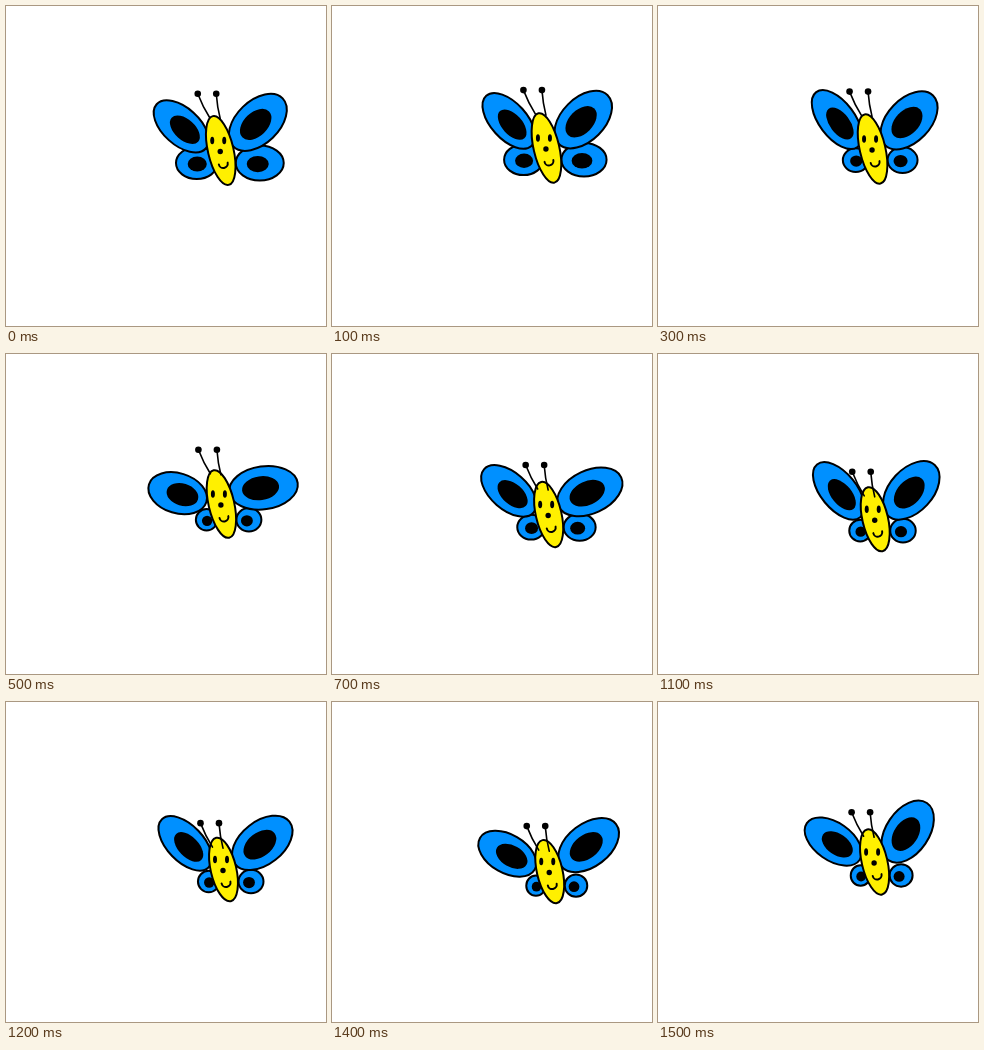
Recreate the animation shown at these times as an HTML page with a canvas. Size 320 by 320 pixels, loop 1.6 s.

```html
<!DOCTYPE html>
<html lang="en">
<head>
<meta charset="utf-8">
<title>Butterfly</title>
<style>
html, body { margin: 0; width: 100%; height: 100%; overflow: hidden; background: #fff; }
canvas { display: block; width: 320px; height: 320px; }
</style>
</head>
<body>
<canvas id="stage" width="320" height="320"></canvas>
<script>
const ctx = document.getElementById('stage').getContext('2d');
const BLUE = '#0090ff', YELLOW = '#fff000', INK = '#000';
const STEP = 100, STEPS = 16, RAD = Math.PI / 180;

// Key poses of the flight: step, height, left lift, right lift, lower wing spread
const keys = [
  [0, 144.5, 42, 44, 25],
  [3, 143, 53, 46, 16],
  [5, 150, 17, 8, 13.5],
  [7, 160.5, 41, 25, 17],
  [9, 161.5, 54, 60, 14.5],
  [12, 167.5, 46, 38, 13.5],
  [13.5, 172, 30, 30, 13],
  [15, 160, 35, 56, 12.5]
];

// Key at any index, with its time carried on around the loop
function keyAt(i) {
  const n = keys.length, lap = Math.floor(i / n);
  const [t, ...pose] = keys[i - lap * n];
  return { t: t + lap * STEPS, pose };
}

// Smooth closed curve through the key poses
function poseAt(step) {
  const i = keys.findLastIndex(k => k[0] <= step);
  const [a, b, c, d] = [-1, 0, 1, 2].map(o => keyAt(i + o));
  const span = c.t - b.t, u = (step - b.t) / span;
  return b.pose.map((p, j) => {
    const q = c.pose[j];
    const m = (q - a.pose[j]) / (c.t - a.t) * span;
    const n = (d.pose[j] - p) / (d.t - b.t) * span;
    return p + u * (m + u * (3 * (q - p) - 2 * m - n + u * (2 * (p - q) + m + n)));
  });
}

function oval(x, y, rx, ry, deg, fill, outlined = true) {
  ctx.beginPath();
  ctx.ellipse(x, y, rx, ry, deg * RAD, 0, Math.PI * 2);
  ctx.fillStyle = fill;
  ctx.fill();
  if (outlined) {
    ctx.lineWidth = 2;
    ctx.stroke();
  }
}

const dot = (x, y, rx, ry = rx, deg = 0) => oval(x, y, rx, ry, deg, INK, false);

// side is -1 for left, 1 for right; the wing turns about its root
function upperWing(side, rootX, rootY, long, wide, lift, shift) {
  const dx = side * Math.cos(lift * RAD), dy = -Math.sin(lift * RAD);
  const deg = -side * lift, mid = long - shift;
  oval(rootX + dx * long, rootY + dy * long, long, wide - 1, deg, BLUE);
  dot(rootX + dx * mid, rootY + dy * mid, long * 0.54, wide * 0.53, deg);
}

function lowerWing(x, y, rx, ry, spotShift) {
  oval(x, y, rx - 1, ry - 1, 0, BLUE);
  dot(x + spotShift, y + 1, rx * 0.44, ry * 0.44);
}

function drawFace(x, y) {
  for (const side of [-1, 1]) dot(x - 2 + side * 6, y - 11, 2, 3.8);
  dot(x, y, 2.7);
  ctx.lineWidth = 2;
  ctx.beginPath();
  ctx.arc(x + 3, y + 12, 4.5, -0.2, Math.PI - 0.2);
  ctx.stroke();
}

function feeler(x, y, dx, dy) {
  ctx.lineWidth = 1.6;
  ctx.beginPath();
  ctx.moveTo(x, y);
  ctx.quadraticCurveTo(x + dx / 2 - 1, y + dy / 2 + 1, x + dx, y + dy);
  ctx.stroke();
  dot(x, y, 3.3);
}

function draw(step) {
  const [y, left, right, spread] = poseAt(step);
  const sink = y - 155;
  const x = 216 + sink * 0.12;
  const lowY = y + 18 - left * 0.13, lowH = 6 + spread * 0.5;
  const tipY = y - 52 + sink * 0.45;

  ctx.fillStyle = '#fff';
  ctx.fillRect(0, 0, 320, 320);
  ctx.strokeStyle = INK;
  ctx.lineCap = ctx.lineJoin = 'round';

  lowerWing(x - 4 - spread * 0.8, lowY, spread * 0.87, lowH * 0.92, 0.5);
  lowerWing(x + 14 + spread, lowY, spread, lowH, -2);
  upperWing(-1, x - 15, y - 2, 28 + left * 0.12, 22 - left * 0.06, left, 5);
  upperWing(1, x + 7 + right * 0.12, y - 13 + right * 0.2, 34.5, 22.5, right, 3);
  oval(x, y, 34 - sink * 0.12, 12.8, 77, YELLOW);
  drawFace(x - 0.5, y + 1);
  feeler(x - 23, tipY, 12, 24);
  feeler(x - 4.5, tipY, 4, 25);
}

let start = null, last = -1;
function tick(now) {
  if (start === null) start = now;
  const step = Math.floor(Math.max(0, now - start) / STEP) % STEPS;
  if (step !== last) draw(last = step);
  requestAnimationFrame(tick);
}
draw(0);
requestAnimationFrame(tick);
</script>
</body>
</html>
```
